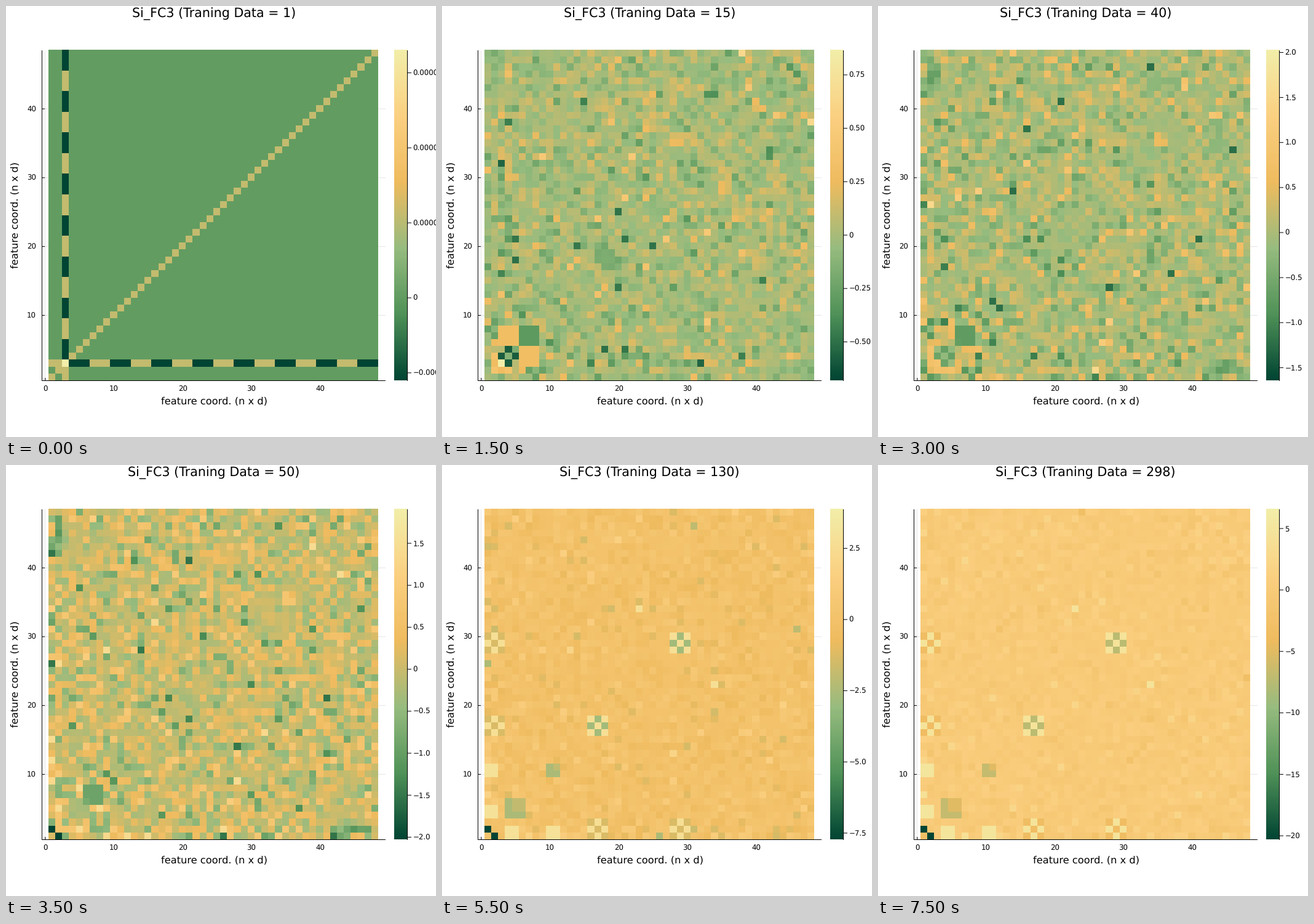
A matplotlib script for the animation above (8 s loop, 699x700 px).

```python
import numpy as np
import matplotlib.pyplot as plt
from matplotlib.animation import FuncAnimation
from matplotlib.colors import LinearSegmentedColormap

W, H, DPI = 699, 700, 100
N = 48
TOP, BOTTOM = 72, 608.5
PX = 72 / DPI
CMAP = LinearSegmentedColormap.from_list(
    "field", ["#004433", "#509258", "#97bc7f", "#efbb5f", "#fbd081", "#f2eea9"])

SIZES = [1, 5, 10, 15, 20, 30, 40, 50, 60, 80, 100, 130, 160, 200, 250, 298]
UNIT = 2.75e-5  # coupling strength found in a single sample

# key points over the training size
KEY_SIZES = [1, 15, 30, 50, 80, 130, 298]
KEY_LOW = [-UNIT, -.68, -1.256, -2.026, -3.315, -7.72, -20.29]
KEY_HIGH = [3 * UNIT, .865, 2.143, 1.904, 2.281, 3.87, 6.56]
KEY_SIGMA = [0, .115, .2, .39, .46, .46, .6]


def at_size(n, values):
    return float(np.interp(n, KEY_SIZES, values))


def ramp(n, start, end):
    return float(np.clip((n - start) / (end - start), 0, 1))


def first_sample():
    m = np.eye(N)
    m[2] = m[:, 2] = np.where((np.arange(N) // 3) % 2, -1, 1)
    m[2, 2] = 3
    return m * UNIT


def noise_fields():
    """Symmetric noise averaged over a growing number of samples."""
    rng = np.random.default_rng(7)
    total, seen, fields = np.zeros((N, N)), 0, []
    for n in SIZES:
        a = np.triu(rng.normal(size=(N, N)))
        total += (a + np.triu(a, 1).T) * np.sqrt(n - seen)
        seen = n
        z = total / np.sqrt(n)
        gain = np.ones(N)
        gain[2:4] += .6 * ramp(n, 50, 30)
        gain[:2] += .6 * ramp(n, 30, 50)
        heavy_tailed = z * (.8 + .07 * z ** 2)
        fields.append(heavy_tailed * np.outer(gain, gain) * at_size(n, KEY_SIGMA))
    return fields


def add_couplings(m, n, lo, hi):
    """Blend strong blocks into m, mirrored across the diagonal."""

    def blend(rows, cols, value, weight):
        for i in rows:
            for j in cols:
                mixed = (1 - weight) * m[i - 1, j - 1] + weight * value
                m[i - 1, j - 1] = m[j - 1, i - 1] = mixed

    early, late = ramp(n, 50, 30), ramp(n, 30, 90)

    # couplings of the first samples, fading out
    blend([3], [3], hi, early)
    blend([3, 5], [4], .85 * lo, early)
    blend([3, 4, 5], [6, 7, 8], .35 * hi, early)
    blend([3], [32], .8 * lo, early)
    blend([4], [38], .65 * lo, early)
    block = range(6, 9)
    blend(block, block, .45 * lo, ramp(n, 120, 60))

    # solid blocks, then alternating ones, fading in
    for start, size in ((4, 3), (10, 2)):
        block = range(start, start + size)
        blend([start], block, .33 * lo, late)
        blend(block[1:], block[1:], .25 * lo, late)
        blend([1, 2], block[:2], .75 * hi, late)
    for start in (16, 28):
        for j in range(start, start + 3):
            for i in (1, 2, 3, *range(start, j + 1)):
                bright = (i + j) % 2 == 0
                dark = .36 if i >= start else .17
                blend([i], [j], .7 * hi if bright else dark * lo, late)
    blend([1], [2], lo, ramp(n, 30, 50))


noise = noise_fields()


def field(k, lo, hi):
    if k == 0:
        return first_sample()
    m = np.clip(noise[k], .75 * lo, .75 * hi)
    add_couplings(m, SIZES[k], lo, hi)
    return m


def px_x(v):
    return 63.8 + 11.17 * v


def px_y(v):
    return 614.2 - 11.178 * v


plt.rcParams.update({"font.family": "DejaVu Sans", "text.hinting": "no_hinting"})
fig = plt.figure(figsize=(W / 100, H / 100), dpi=DPI, facecolor="white")
ax = fig.add_axes([0, 0, 1, 1])
ax.axis("off")


def label(x, y, s, size, ha="center", **kw):
    return ax.text(x, y, s, fontsize=size * PX, ha=ha, va="baseline", **kw)


def line(xs, ys, **kw):
    style = dict(color="black", lw=PX, solid_capstyle="butt", zorder=3, snap=False)
    return ax.plot(xs, ys, **(style | kw))[0]


for v in range(0, 41, 10):
    x, y = px_x(v), px_y(v)
    line([x, x], [TOP, BOTTOM], alpha=.1, zorder=0)
    line([x, x], [BOTTOM, 604], zorder=1)
    label(x, 626, str(v), 11.8)
    if v:
        line([58, 617], [y, y], alpha=.1, zorder=0)
        line([58, 63], [y, y], zorder=1)
        label(49, y + 4.3, str(v), 11.8, ha="right")
for x in (58.5, 652.5):
    line([x, x], [TOP, 609])
line([58, 617], [BOTTOM, BOTTOM])

label(338, 647, "feature coord. (n x d)", 16.2)
label(20, 340, "feature coord. (n x d)", 16.2, rotation=90, rotation_mode="anchor")
title = label(337.7, 18, "", 20.6)


def heatmap(data, left, right):
    return ax.imshow(data, cmap=CMAP, vmin=0, vmax=1, origin="lower",
                     extent=(left, right, 608.4, TOP), aspect="auto",
                     interpolation="nearest", zorder=2)


heat = heatmap(np.zeros((N, N)), 69.2, 605)
heatmap(np.linspace(0, 1, 256)[:, None], 631, 652)
bar_ticks = line([], [])
bar_labels = [label(661.5, 0, "", 11.8, ha="left") for _ in range(12)]
ax.set_xlim(0, W)
ax.set_ylim(H, 0)


def tick_step(span):
    """Smallest round step that leaves about nine intervals or fewer."""
    steps = (b * 10.0 ** e for e in range(-6, 3) for b in (1, 2.5, 5))
    return next(s for s in steps if span / s < 9.2)


def tick_text(value, step):
    if abs(value) < step / 2:
        return "0"
    digits = next(d for d in range(9) if np.isclose(round(step, d), step, atol=0))
    return f"{value:.{digits}f}".replace("-", "\u2212")


def update(k):
    n = SIZES[k]
    lo, hi = at_size(n, KEY_LOW), at_size(n, KEY_HIGH)
    step = tick_step(hi - lo)
    title.set_text(f"Si_FC3 (Traning Data = {n})")
    heat.set_data((field(k, lo, hi) - lo) / (hi - lo))
    values = np.arange(np.ceil(lo / step), np.floor(hi / step) + 1) * step
    ys = 608 - (values - lo) / (hi - lo) * (608 - TOP)
    bar_ticks.set_data(np.tile([652, 659, np.nan], len(ys)), np.repeat(ys, 3))
    for text in bar_labels:
        text.set_text("")
    for text, value, y in zip(bar_labels, values, ys):
        text.set_text(tick_text(value, step))
        text.set_y(y + 4.3)
    return [title, heat, bar_ticks, *bar_labels]


anim = FuncAnimation(fig, update, frames=len(SIZES), interval=500,
                     repeat=True, repeat_delay=0, blit=False)
plt.show()
```
